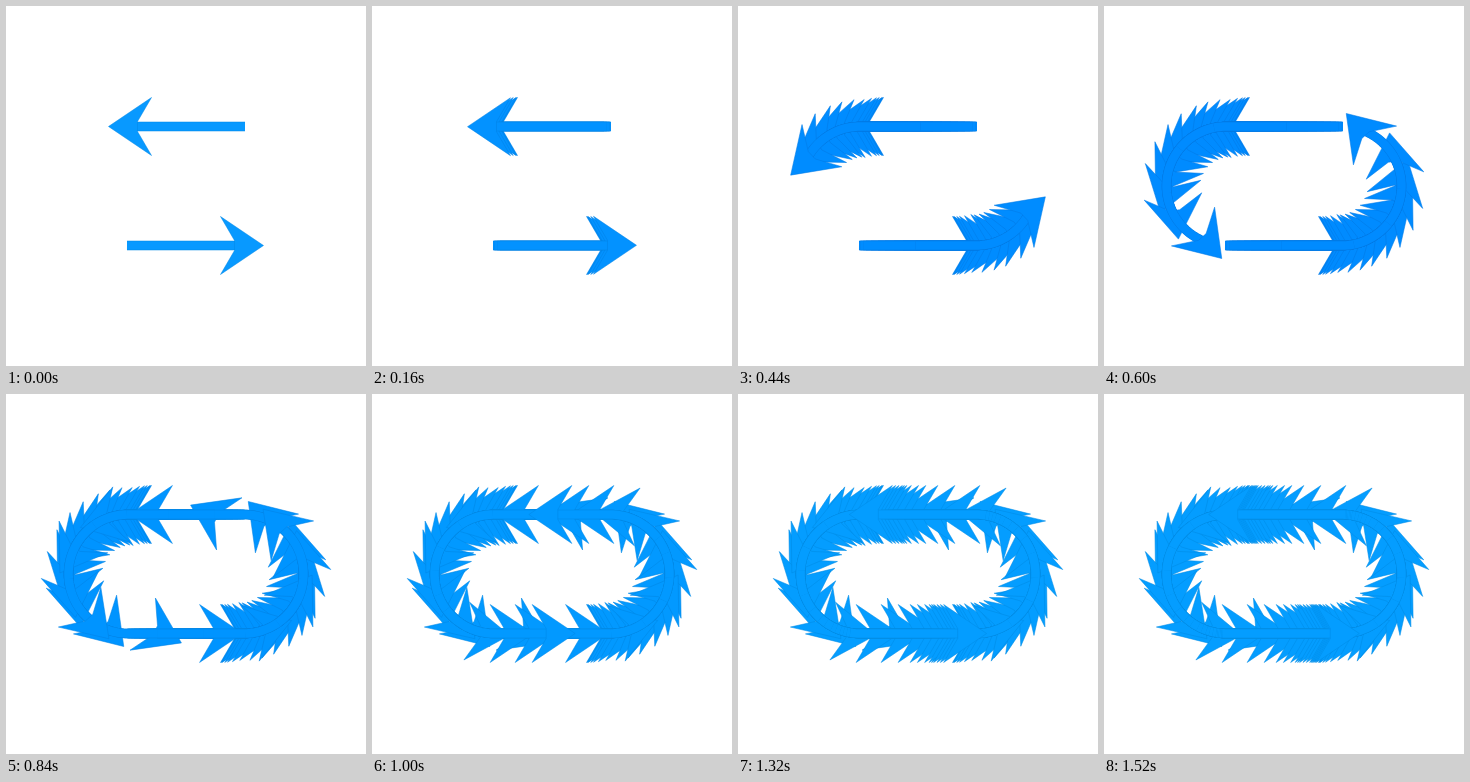
These frames come from a looping animation (360 by 360 pixels, 1560 ms). An HTML page with a canvas:

```html
<!DOCTYPE html>
<html lang="en">
<head>
<meta charset="utf-8">
<title>Swapping arrows</title>
<style>
  html, body { margin: 0; width: 100%; height: 100%; overflow: hidden; background: #fff; }
  canvas { display: block; width: 360px; height: 360px; }
</style>
</head>
<body>
<canvas id="stage" width="360" height="360"></canvas>
<script>
const ctx = document.getElementById('stage').getContext('2d');
const LOOP = 1560, STEP = 40;
const CX = 122, R = 59.5, ARC = Math.PI * R, HALF = ARC + 116;

// step, distance along the track, how far the heading trails behind
const MOVES = [
  [0, -2, 16], [2, -0.5, 16], [4, 5, 16], [5, 10, 16], [7, 24, 16], [9, 42, 19],
  [11, 67, 22], [12, 83, 24], [13, 100, 24], [14, 127, 26], [15, 168, 31],
  [16, 221, 61], [17, 280, 40], [18, 331, 10], [19, 377, 15], [20, 419, 15],
  [21, 454, 13], [22, 484, 0], [23, 507.5, 0], [24, 532.5, 0], [25, 549.5, 0],
  [26, 561.5, 0], [28, 576, 0], [30, 585, 0], [33, 595, 0], [39, 603, 0]
];

// step, red, green
const TINTS = [[0, 8, 153], [7, 0, 140], [15, 0, 139], [21, 0, 148], [29, 4, 157], [39, 4, 157]];

function sample(rows, t) {
  let i = 1;
  while (i < rows.length - 1 && rows[i][0] < t) i++;
  const a = rows[i - 1], b = rows[i];
  const k = (t - a[0]) / (b[0] - a[0]);
  return a.slice(1).map((v, j) => v + (b[j + 1] - v) * k);
}

// Position on the rounded track; every half is the other one turned by 180 degrees.
function track(s, lag = 0) {
  const lap = Math.floor(s / HALF), u = s - lap * HALF;
  const phi = Math.min(u, ARC) / R;
  let x = CX - R * Math.sin(phi) + Math.max(0, u - ARC);
  let y = 180 - R * Math.cos(phi);
  const turn = Math.min(ARC, Math.max(0, u - lag)) / R;
  if (lap & 1) { x = 360 - x; y = 360 - y; }
  return { x, y, angle: Math.PI - turn - lap * Math.PI };
}

function drawArrow(s, lag, fill, edge) {
  ctx.beginPath();
  for (let d = -115; d <= 0; d += 2.5) {
    const p = track(s + d);
    ctx.lineTo(p.x, p.y);
  }
  ctx.lineWidth = 9.5;
  ctx.strokeStyle = edge;
  ctx.stroke();
  ctx.lineWidth = 8.6;
  ctx.strokeStyle = fill;
  ctx.stroke();

  const p = track(s, lag);
  ctx.save();
  ctx.translate(p.x, p.y);
  ctx.rotate(p.angle);
  ctx.beginPath();
  ctx.moveTo(21.5, 0);
  ctx.lineTo(-21.5, 29);
  ctx.lineTo(-7.5, 5);
  ctx.lineTo(-7.5, -5);
  ctx.lineTo(-21.5, -29);
  ctx.closePath();
  ctx.fillStyle = fill;
  ctx.fill();
  ctx.lineWidth = 0.5;
  ctx.strokeStyle = edge;
  ctx.stroke();
  ctx.restore();
}

function draw(last) {
  const [r, g] = sample(TINTS, last).map(Math.round);
  const fill = `rgb(${r},${g},255)`, edge = `rgb(0,${g - 18},228)`;
  ctx.fillStyle = '#fff';
  ctx.fillRect(0, 0, 360, 360);
  // Earlier poses stay on the stage until the loop restarts.
  for (let n = 0; n <= last; n++) {
    const [s, lag] = sample(MOVES, n);
    drawArrow(s, lag, fill, edge);
    drawArrow(s + HALF, lag, fill, edge);
  }
}

let shown = -1;
const start = performance.now();
function tick() {
  const n = Math.floor(((performance.now() - start) % LOOP) / STEP);
  if (n !== shown) draw(shown = n);
  requestAnimationFrame(tick);
}
tick();
</script>
</body>
</html>
```
